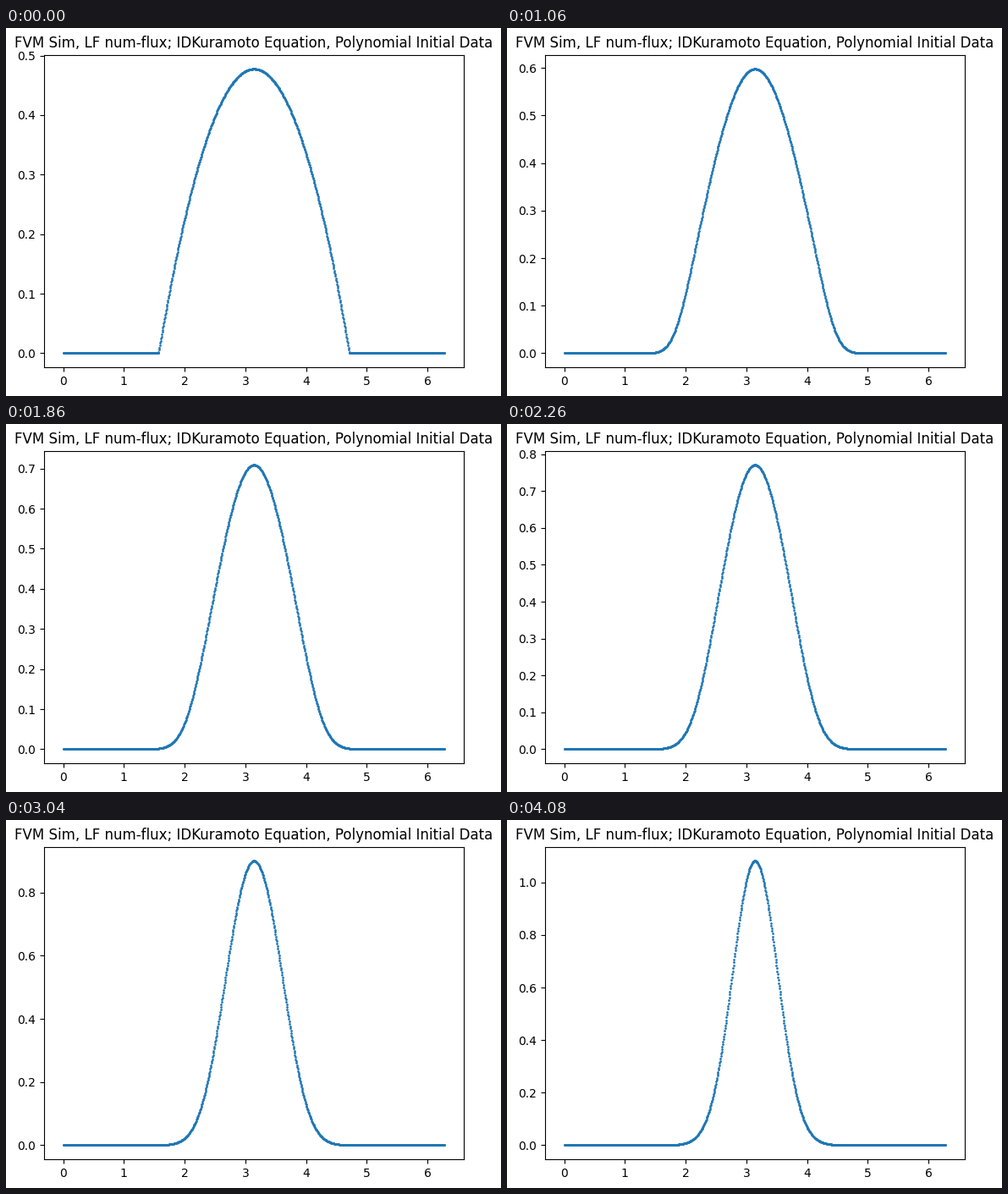
These frames come from a looping animation (585 by 435 pixels, 4100 ms). A matplotlib script:

```python
import numpy as np
import matplotlib.pyplot as plt
from matplotlib.animation import FuncAnimation

FRAMES, INTERVAL = 205, 20
W, H, DPI = 585, 435, 100
CELLS, SUBSTEPS = 1000, 15
DT = 0.0057 / SUBSTEPS

dx = 2 * np.pi / CELLS
x = (np.arange(CELLS) + 0.5) * dx
speed_cap = dx / DT


def initial(x):
    """Unit-mass parabola supported on [pi/2, 3pi/2]."""
    a = np.pi / 2
    return np.maximum(0, 3 / (4 * a**3) * (a**2 - (x - np.pi) ** 2))


def velocity(rho):
    """Mean-field coupling of identical oscillators."""
    c = np.sum(rho * np.cos(x)) * dx
    s = np.sum(rho * np.sin(x)) * dx
    return s * np.cos(x) - c * np.sin(x)


def step(rho):
    """One Lax-Friedrichs finite volume step on the circle."""
    f = rho * velocity(rho)
    flux = 0.5 * (f + np.roll(f, -1)) - 0.5 * speed_cap * (np.roll(rho, -1) - rho)
    return rho - DT / dx * (flux - np.roll(flux, 1))


def simulate():
    rho = initial(x)
    states = [rho]
    for _ in range(FRAMES - 1):
        for _ in range(SUBSTEPS):
            rho = step(rho)
        states.append(rho)
    return states


states = simulate()

# The tiny offset keeps float rounding from losing a pixel row.
fig = plt.figure(figsize=((W + 1e-3) / DPI, (H + 1e-3) / DPI), dpi=DPI)
ax = fig.add_axes([45 / W, 33.8 / H, 496 / W, 369.6 / H])
ax.set_title("FVM Sim, LF num-flux; IDKuramoto Equation, Polynomial Initial Data")
dots, = ax.plot(x, states[0], "o", ms=1, color="C0")
pad = 0.05 * 2 * np.pi
ax.set_xlim(-pad, 2 * np.pi + pad)


def draw(i):
    rho = states[i]
    peak = rho.max()
    dots.set_ydata(rho)
    ax.set_ylim(-0.05 * peak, 1.05 * peak)
    return dots,


anim = FuncAnimation(fig, draw, frames=FRAMES, interval=INTERVAL,
                     init_func=lambda: draw(0), repeat=True, repeat_delay=0)
plt.show()
```
